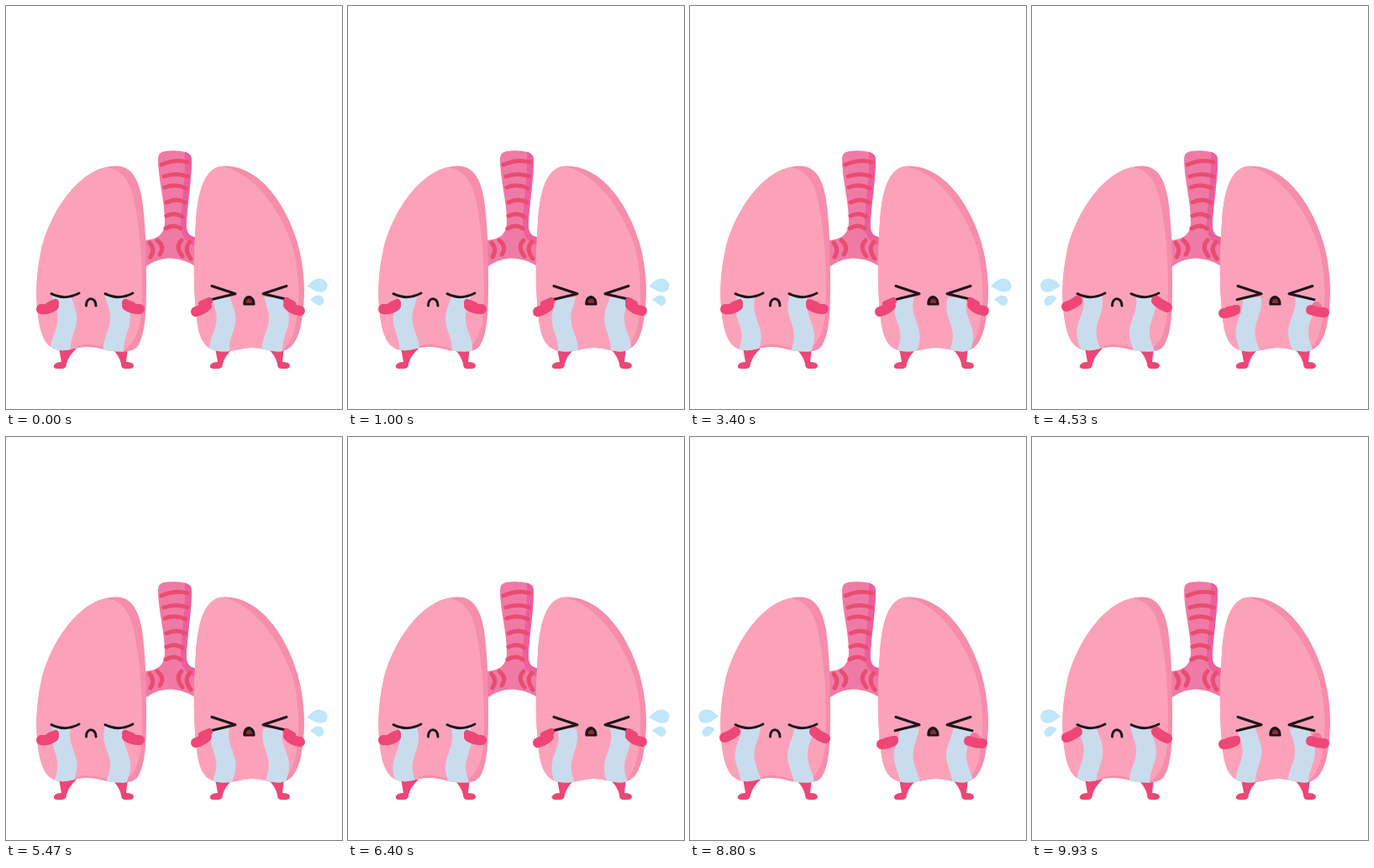
An HTML page for the animation above (9990 ms loop, 400 by 480 pixels).

```html
<!DOCTYPE html>
<html lang="en">
<head>
<meta charset="utf-8">
<title>Crying lungs</title>
<style>
html, body { margin: 0; width: 100%; height: 100%; overflow: hidden; background: #fff; }
svg { display: block; width: 100vw; height: 100vh; }
.line { fill: none; stroke: #1d1418; stroke-width: 3; stroke-linecap: round; stroke-linejoin: round; }
.limb { fill: #ee4677; }
.arm { fill: none; stroke: #ee4677; stroke-width: 12; stroke-linecap: round; stroke-linejoin: round; }
.thumb { stroke-width: 8; }
.ring { fill: none; stroke: #e94c70; stroke-width: 5; stroke-linecap: round; }
.lit { fill: #fba2ba; }
.shade { fill: #f68dab; }
.tear { fill: #c9dced; }
.drop { fill: #bfe6f9; }
</style>
</head>
<body>
<svg viewBox="0 0 400 480" xmlns="http://www.w3.org/2000/svg">
  <defs>
    <path id="lungL" d="M131 190.6C150 191 158 207 162 230C166 258 167 290 167 330C167 365 166 388 158 403C153 412 143 412 132 411.5C118 411 110 406 96 406C84 406 76 411 64 410C48 408 41 393 38 368C35 343 36 318 42 291C51 250 86 190.6 131 190.6Z"/>
    <path id="lungR" d="M260 190.6C305 191 335 241 347 282C355 310 357 342 353 368C350 393 343 410 326 411.5C314 412 306 407 293 407C280 407 272 412 258 411.5C237 411 230 398 227 372C223 340 223 298 226 258C228 225 235 190.6 260 190.6Z"/>
    <clipPath id="clipL"><use href="#lungL"/></clipPath>
    <clipPath id="clipR"><use href="#lungR"/></clipPath>
    <path id="windpipe" d="M181 182Q181 174 189 173Q202 171 214 174Q221 176 221 184C221 205 216 238 215 256C214 270 217 275 230 276V313C217 304 207 301 194 300.5C181 301 173 306 162 313V279C180 279 189 272 189 257C189 232 181 206 181 182Z"/>
    <clipPath id="clipW"><use href="#windpipe"/></clipPath>
    <g id="legs" class="limb">
      <path d="M63 407L84 408Q75 416 72 426Q72 432 66 432H61Q56 432 57 428Q59 424 66 424Z"/>
      <path d="M127 409L145 407L143 424Q151 424 152 428Q152 432 147 432H142Q137 432 137 426Q135 417 127 409Z"/>
    </g>
  </defs>

  <use href="#windpipe" fill="#f07aa6"/>
  <g clip-path="url(#clipW)">
    <path d="M213 170C214 205 209 235 208 256C207 274 214 283 232 288V170Z" fill="#ec5f9b"/>
  </g>
  <path class="ring" d="M185 189Q201 182 216 186M188 203Q203 198 216 203M189 216Q202 211 214 217M191 234Q203 228 213 234M191 250Q201 245 210 251M190 265Q200 259 208 265"/>
  <path class="ring" d="M171 282Q178 290 172 299M180 279Q190 287 183 296M209 279Q201 287 210 298M219 281Q211 289 220 301"/>

  <use href="#legs"/>
  <use href="#legs" x="186"/>

  <use href="#lungL" class="shade"/>
  <path class="lit" clip-path="url(#clipL)" d="M0 180H115V191C142 194 150 214 154 240C160 272 162 305 162 340C162 377 158 397 142 409C124 411 111 403 96 403C86 403 80 409 70 413H0Z"/>
  <use href="#lungR" class="shade"/>
  <path class="lit" clip-path="url(#clipR)" d="M210 180H254V190C296 197 327 245 340 283C348 308 350 340 347 365C344 390 339 403 326 413H210Z"/>

  <g clip-path="url(#clipL)"><path class="tear"/><path class="tear"/></g>
  <g clip-path="url(#clipR)"><path class="tear"/><path class="tear"/></g>

  <path class="line" d="M54 342.7Q70 351 87 342M118 342.7Q134 351 151 342"/>
  <path class="line" d="M95.5 357C95 346 107 346 107 357"/>
  <path class="line" d="M245 333.5L273 342.7L244 349.7M334 333.5L306 342.7L336 349.7"/>
  <path d="M283 356C281 342 297 342 296 356Z" fill="#1d1418" stroke="#1d1418" stroke-linejoin="round"/>
  <path d="M286 354C285 347 294 347 293 354Z" fill="#8d2b31"/>

  <g id="poseA">
    <path class="arm" d="M42 361Q50 362 57 357M144 357Q150 361 159 361M226 364Q234 362 239 357M336 356Q341 362 350 363"/>
    <path class="arm thumb" d="M52 356L59 353M142 353L150 356M233 355L242 351M334 351L341 355"/>
    <path class="drop" d="M358 334C365 327 370 323 376 325C384 328 385 337 378 340C371 343 365 337 358 334Z"/>
    <path class="drop" d="M362 350C367 345 372 343 376 346C380 350 379 355 374 357C369 357 367 352 362 350Z"/>
  </g>
  <g id="poseB">
    <path d="M333 359Q333 352 339 352Q345 353 345 359Z" fill="#f0769c"/>
    <path class="arm" d="M41 358Q48 356 54 351M148 351Q153 356 161 359M228 366Q235 366 242 362M332 362Q340 365 348 365"/>
    <path class="arm thumb" d="M234 362L244 360"/>
    <path class="drop" d="M34 333C28 326 22 323 17 325C9 327 8 336 14 340C22 343 28 337 34 333Z"/>
    <path class="drop" d="M30 348C25 344 20 344 17 347C13 351 14 355 18 357C24 357 26 351 30 348Z"/>
  </g>
</svg>
<script>
const LOOP = 9990, STEPS = 150, WAVE = 72;
const tears = [...document.querySelectorAll('.tear')];
const poseA = document.getElementById('poseA');
const poseB = document.getElementById('poseB');
// centre x, width, top y of each stream
const streams = [[69, 22, 345], [132, 23, 345], [258, 22, 347], [321, 23, 347]];

function stream([cx, w, top], turn) {
  const left = [], right = [];
  for (let y = top; y <= 416; y += 3) {
    const x = cx + 4 * Math.cos(2 * Math.PI * ((y - 372) / WAVE + turn));
    const half = w / 2 + (y - top) / 80;
    left.push((x - half).toFixed(2) + ' ' + y);
    right.unshift((x + half).toFixed(2) + ' ' + y);
  }
  return 'M' + left.concat(right).join('L') + 'Z';
}

function draw(ms) {
  const step = Math.floor((ms % LOOP) / LOOP * STEPS);
  const sec = step / 15;
  streams.forEach((s, i) => tears[i].setAttribute('d', stream(s, sec / 2)));
  const first = sec % 1 < 0.5;
  poseA.style.display = first ? '' : 'none';
  poseB.style.display = first ? 'none' : '';
}

const start = performance.now();
function tick() {
  draw(performance.now() - start);
  requestAnimationFrame(tick);
}
tick();
</script>
</body>
</html>
```
